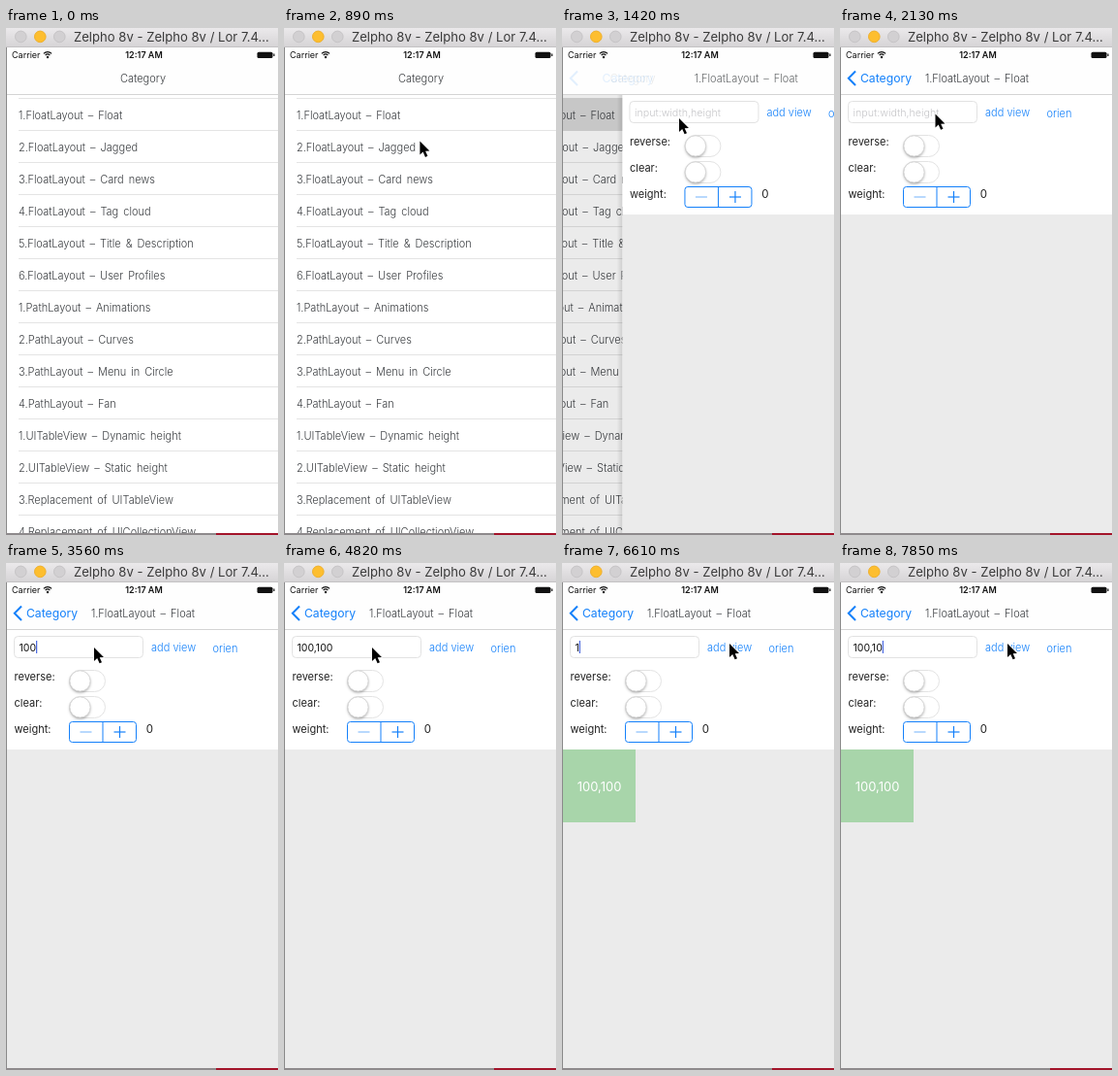
Write an HTML page with a canvas that moves like this. It is 281 px wide and 522 px high and loops after 8000 ms.

```html
<!DOCTYPE html>
<html lang="en">
<head>
<meta charset="utf-8">
<title>Float layout demo</title>
<style>
  html, body { margin: 0; width: 100%; height: 100%; overflow: hidden; background: #fff; }
  canvas { display: block; width: 281px; height: 522px; }
</style>
</head>
<body>
<canvas id="stage"></canvas>
<script>
const W = 281, H = 522, LOOP = 8000, STEP = 178;
const BLUE = '#1480fa', INK = '#3a3d40', DARK = '#222';
const FONT = 'Inter, "Open Sans", sans-serif';
const ROWS = [
  '1.FloatLayout – Float', '2.FloatLayout – Jagged', '3.FloatLayout – Card news',
  '4.FloatLayout – Tag cloud', '5.FloatLayout – Title & Description',
  '6.FloatLayout – User Profiles', '1.PathLayout – Animations', '2.PathLayout – Curves',
  '3.PathLayout – Menu in Circle', '4.PathLayout – Fan', '1.UITableView – Dynamic height',
  '2.UITableView – Static height', '3.Replacement of UITableView',
  '4.Replacement of UICollectionView'
];
// [time, field value, caret visible]
const TYPING = [
  [0, '', 0], [2490, '', 1], [2840, '', 0], [3020, '', 1],
  [3200, '1', 1], [3380, '10', 1], [3560, '100', 1],
  [4100, '100,', 1], [4280, '100,1', 1], [4460, '100,10', 1], [4640, '100,100', 1],
  [4820, '100,100', 0], [5360, '100,100', 1],
  [6430, '', 1], [6610, '1', 1], [6780, '10', 1], [6960, '100', 1],
  [7500, '100,', 1], [7680, '100,1', 1], [7850, '100,10', 1]
];
// [start, steps, from, to]
const MOVES = [
  [170, 5, [218, 211], [121, 93]],
  [1420, 4, [121, 93], [91, 87]],
  [5360, 2, [91, 87], [173, 83]]
];
const CLICKS = [1240, 2310, 5890];

const canvas = document.getElementById('stage');
const c = canvas.getContext('2d');
const dpr = window.devicePixelRatio || 1;
canvas.width = Math.round(W * dpr);
canvas.height = Math.round(H * dpr);

const mix = (a, b, k) => a + (b - a) * k;
const steps = (t, start) => Math.floor((t - start) / STEP);
const between = (t, a, b) => t >= a && t < b;

function rect(x, y, w, h, fill) {
  c.fillStyle = fill;
  c.fillRect(x, y, w, h);
}

function text(s, x, y, size = 11, color = INK, weight = 300, align = 'left') {
  c.font = `${weight} ${size}px ${FONT}`;
  c.textAlign = align;
  c.fillStyle = color;
  c.fillText(s, x, y);
}

// List labels and titles use wider word gaps.
function label(s, x, y, align) {
  c.save();
  c.wordSpacing = '1.9px';
  text(s, x, y, 11, INK, 300, align);
  c.restore();
}

function round(x, y, w, h, r, fill, stroke) {
  c.beginPath();
  c.roundRect(x, y, w, h, r);
  if (fill) { c.fillStyle = fill; c.fill(); }
  if (stroke) { c.strokeStyle = stroke; c.lineWidth = 1; c.stroke(); }
}

function disc(x, y, r, fill, stroke) {
  c.beginPath();
  c.arc(x, y, r, 0, Math.PI * 2);
  if (fill) { c.fillStyle = fill; c.fill(); }
  if (stroke) { c.strokeStyle = stroke; c.lineWidth = 1; c.stroke(); }
}

function line(points, color, width) {
  c.beginPath();
  points.forEach(([x, y]) => c.lineTo(x, y));
  c.strokeStyle = color;
  c.lineWidth = width;
  c.stroke();
}

function faded(alpha, draw) {
  c.save();
  c.globalAlpha *= Math.max(0, Math.min(1, alpha));
  draw();
  c.restore();
}

function windowBar() {
  const g = c.createLinearGradient(0, 0, 0, 20);
  g.addColorStop(0, '#ebe9eb');
  g.addColorStop(1, '#d5d3d5');
  rect(0, 0, W, 20, g);
  rect(0, 19, W, 1, '#c4c2c4');
  disc(15.3, 8.9, 5.8, '#d2d0d2', '#c6c4c6');
  disc(35.3, 8.9, 5.8, '#fdbe2f', '#efb02c');
  disc(55.3, 8.9, 5.8, '#d2d0d2', '#c6c4c6');
  text('Zelpho 8v - Zelpho 8v / Lor 7.4...', 70, 14, 13.1, '#3a3a3a', 400);
}

function statusBar() {
  text('Carrier', 6, 31, 9, '#111', 400);
  text('12:17 AM', 142.5, 31, 9, '#111', 600, 'center');
  c.strokeStyle = '#111';
  c.lineWidth = 1.3;
  for (const r of [3.4, 5.8]) {
    c.beginPath();
    c.arc(43, 30.5, r, -Math.PI * .75, -Math.PI * .25);
    c.stroke();
  }
  disc(43, 30, 1.2, '#111');
  round(259.5, 24.8, 16, 6.2, 1.5, '#111');
  rect(276.3, 26.5, 1.2, 2.5, '#111');
}

function navBar(p) {
  rect(1, 20, W - 1, 48, '#fefefe');
  rect(1, 68, W - 1, 1, '#d4d4d4');
  statusBar();
  const back = p > .97 ? 1 : p * .15;
  faded(p ? (1 - p) * .5 : 1, () => label('Category', mix(141.5, 54, p), 56, 'center'));
  faded(back, () => {
    line([[16, 44.5], [8.8, 51.8], [16, 59]], BLUE, 2);
    text('Category', mix(141.5, 47.5, p), 56, 12.2, BLUE, 400, 'center');
  });
  faded(p, () => label(ROWS[0], 141.5 + 222 * (1 - p), 56, 'center'));
}

function list(p, pressed) {
  rect(1, 69, W - 1, 451, '#fff');
  c.save();
  c.translate(-84 * p, 0);
  ROWS.forEach((_, i) => rect(13, 72 + i * 33, W + 84, 1, '#e4e4e4'));
  if (pressed) rect(1, 72, W + 84, 34, '#d8d8d8');
  ROWS.forEach((s, i) => label(s, 13, 94 + i * 33));
  c.restore();
  rect(1, 69, W - 1, 451, `rgba(0,0,0,${.1 * p})`);
}

function toggle(y) {
  round(65.5, y + .5, 37, 22, 11, '#fff', '#e3e3e3');
  c.save();
  c.shadowColor = 'rgba(0,0,0,.35)';
  c.shadowBlur = 3 * dpr;
  c.shadowOffsetY = 1.5 * dpr;
  disc(76.5, y + 11.5, 10.5, '#fff');
  c.restore();
  disc(76.5, y + 11.5, 10.7, null, '#d8d8d8');
}

function field(t) {
  const [, value, caret] = TYPING.findLast(k => t >= k[0]);
  round(8.5, 75.5, 133, 22, 4, '#fff', '#e2e2e2');
  if (value) text(value, 13.5, 90.5, 10.5, '#111', 400);
  else text('input:width,height', 13.5, 90.5, 10.7, '#c6c6c9');
  if (!caret) return;
  c.font = `400 10.5px ${FONT}`;
  rect(13.5 + (value ? c.measureText(value).width : 0), 80, 1.2, 13, '#4a68e0');
}

function form(t, x) {
  c.save();
  c.translate(x, 0);
  const shade = c.createLinearGradient(-5, 0, 1, 0);
  shade.addColorStop(0, 'rgba(0,0,0,0)');
  shade.addColorStop(1, 'rgba(0,0,0,.12)');
  if (x > 0) rect(-5, 69, 6, 451, shade);
  rect(1, 69, W, 123, '#fff');
  rect(1, 192, W, 328, '#ebebeb');
  field(t);
  const alpha = between(t, 5890, 6070) ? .17 : between(t, 6070, 6250) ? .7 : 1;
  faded(alpha, () => text('add view', 150, 91, 11, BLUE));
  text('orien', 213.5, 91.5, 11, BLUE);
  ['reverse:', 'clear:', 'weight:'].forEach((s, i) => text(s, 8.5, 121 + 27 * i, 11, DARK, 400));
  toggle(110);
  toggle(137);
  round(65.5, 163.5, 69, 21, 3, '#fff', BLUE);
  line([[100, 163.5], [100, 184.5]], BLUE, 1);
  faded(.5, () => line([[76.5, 174], [88.5, 174]], BLUE, 1.2));
  line([[111.5, 174], [123.5, 174]], BLUE, 1.2);
  line([[117.5, 168], [117.5, 180]], BLUE, 1.2);
  text('0', 144.8, 175, 11.5, DARK, 400);
  if (t >= 6070) {
    rect(1, 192, 75, 75, '#a8d5aa');
    text('100,100', 38.5, 235, 13, '#fff', 400, 'center');
  }
  c.restore();
}

function pointer(t) {
  if (t < 170) return;
  const [start, count, a, b] = MOVES.findLast(m => t >= m[0]);
  const k = Math.min(1, steps(t, start) / count);
  const x = mix(a[0], b[0], k), y = mix(a[1], b[1], k);
  if (CLICKS.some(s => between(t, s, s + 180))) disc(x + 2.3, y + .8, 10.2, null, '#111');
  c.save();
  c.translate(x, y);
  c.beginPath();
  for (const [px, py] of [[0, 0], [0, 14], [3.2, 11], [5.6, 16.3], [8, 15.2], [5.7, 10.2], [10, 10]]) {
    c.lineTo(px, py);
  }
  c.closePath();
  c.lineJoin = 'round';
  c.strokeStyle = '#fff';
  c.lineWidth = 1.6;
  c.stroke();
  c.fillStyle = '#000';
  c.fill();
  c.restore();
}

// Critically damped push, sampled once per step.
function pushed(t) {
  const n = steps(t, 1240);
  if (n < 1) return 0;
  return n > 3 ? 1 : 1 - (1 + 2.87 * n) * Math.exp(-2.87 * n);
}

function draw(t) {
  c.setTransform(dpr, 0, 0, dpr, 0, 0);
  const p = pushed(t);
  if (p < 1) list(p, t >= 1240);
  if (t >= 1240) form(t, (W - 1) * (1 - p));
  navBar(p);
  windowBar();
  rect(0, 20, 1, H - 20, '#8a8a8a');
  rect(0, 520, W, 2, '#8e8a8c');
  rect(217, 520, W - 217, 2, '#a3142a');
  pointer(t);
}

const origin = performance.now();
function tick() {
  draw((performance.now() - origin) % LOOP);
  requestAnimationFrame(tick);
}
tick();
</script>
</body>
</html>
```
